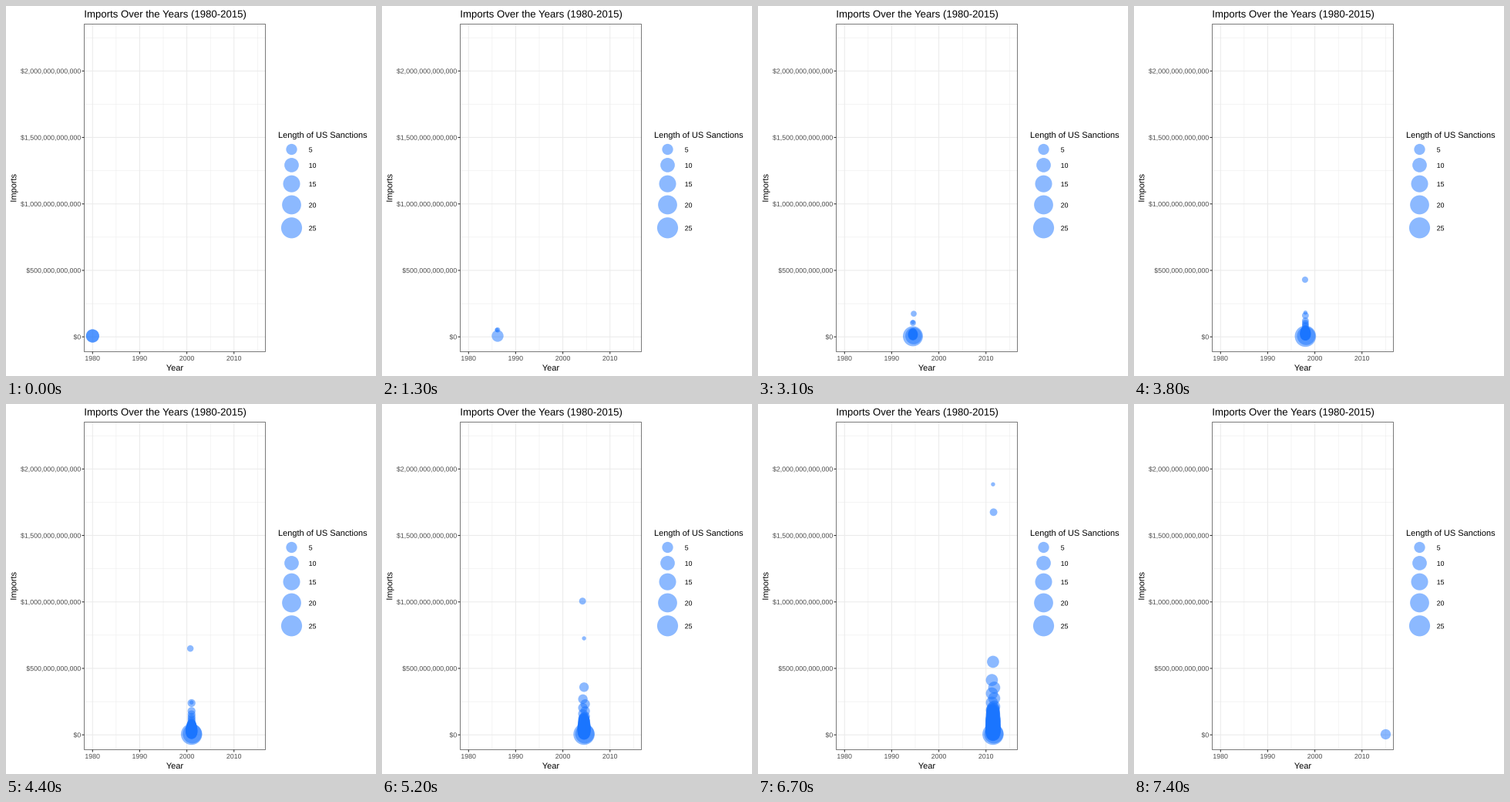
These frames come from a looping animation (480 px wide and 480 px high, 7.5 s). A matplotlib script:

```python
import numpy as np
import matplotlib.pyplot as plt
from matplotlib.animation import FuncAnimation
from matplotlib.patches import PathPatch, Rectangle
from matplotlib.textpath import TextPath
from matplotlib.transforms import Affine2D

plt.rcParams["font.family"] = "Liberation Sans"

SIZE, FRAMES = 480, 75
BLUE, GRID, DARK, GREY = "#1A75FF", "#EBEBEB", "#333333", "#4D4D4D"
LEFT, RIGHT, TOP, BOTTOM = 101.5, 336.5, 23.5, 448.5
BASE = 429.2

fig = plt.figure(figsize=(SIZE / 72, SIZE / 72), dpi=72, facecolor="white")
ax = fig.add_axes([0, 0, 1, 1])
ax.set(xlim=(0, SIZE), ylim=(SIZE, 0))
ax.axis("off")


def year_x(year):
    return 112.3 + year * 6.115


def line(xs, ys, color=DARK, width=1.07, z=2):
    ax.plot(xs, ys, color=color, lw=width, zorder=z, solid_capstyle="butt", snap=False)


def label(x, y, text, size=8.8, color="black", align=0.0, angle=0):
    """Text outline on baseline y; align 0 is left, 0.5 centre, 1 right."""
    path = TextPath((0, 0), text, size=size)
    box = path.get_extents()
    start = -align * (box.x0 + box.x1)
    place = Affine2D().translate(start, 0).scale(1, -1).rotate_deg(-angle).translate(x, y)
    ax.add_patch(PathPatch(place.transform_path(path), fc=color, lw=0, zorder=4))


def bubble_layer(**kw):
    return ax.scatter([], [], c=BLUE, alpha=0.5, linewidths=0, snap=False, **kw)


def set_bubbles(layer, x, y, r):
    layer.set_offsets(np.column_stack([x, y]))
    layer.set_sizes((2 * np.asarray(r)) ** 2)


def radius(length):
    return 2.7 + 2.22 * np.sqrt(np.maximum(length - 1, 0))


def draw_chart():
    for year in range(0, 36, 5):
        x, major = year_x(year), year % 10 == 0
        line([x, x], [TOP, BOTTOM], GRID, 1.07 if major else 0.53, 1 + major)
        if major:
            line([x, x], [BOTTOM, BOTTOM + 3])
            label(x, 460, str(1980 + year), color=GREY, align=0.5)
    for value in range(0, 2251, 250):
        y, major = BASE - value * 0.17245, value % 500 == 0
        line([LEFT, RIGHT], [y, y], GRID, 1.07 if major else 0.53, 1 + major)
        if major:
            line([LEFT - 3, LEFT], [y, y])
            label(97, y + 3.2, f"${value * 10**9:,}", color=GREY, align=1)
    ax.add_patch(Rectangle((LEFT, TOP), RIGHT - LEFT, BOTTOM - TOP, fill=False,
                           ec=DARK, lw=0.65, zorder=5, snap=False))
    label(101.3, 14.8, "Imports Over the Years (1980-2015)", 13.2)
    label(219, 473, "Year", 11, align=0.5)
    label(13.3, 236, "Imports", 11, align=0.5, angle=90)


def draw_legend():
    label(353, 171, "Length of US Sanctions", 11)
    lengths = np.arange(5, 26, 5)
    r = radius(lengths)
    # Keys are stacked edge to edge with a small gap
    y = 186 + np.concatenate([[0], np.cumsum(r[1:] + r[:-1] + 3.9)])
    set_bubbles(bubble_layer(), np.full(5, 370.5), y, r)
    for n, mid in zip(lengths, y):
        label(392.7, mid + 3.5, str(n))


def year_at(f):
    """Each year snaps to its nearest frame; between those, time is linear."""
    years = np.arange(36)
    return np.interp(f, np.round(years * (FRAMES - 1) / 35), years)


def growth(year):
    return 0.1 + 1 / (1 + np.exp((24 - year) / 4))


def crowd(year):
    """Many small importers near zero, joining one by one from 1987."""
    grow, big = growth(year), radius(min(8 + year, 26))
    small = 3 + 5.5 * grow
    for i in range(30):
        if year >= 7 + 0.7 * i:
            rank, spread = (i * 0.618) % 1, 1 - (i * 0.377) % 1
            r = small + (1 - rank) * spread * (big - small)
            yield 0, 0.8 + 36 * grow * rank ** 1.6, r


def middle(year):
    """Mid-sized importers, swaying apart between whole years."""
    grow, apart = growth(year), 3 * abs(year - round(year))
    for j in range(8):
        if year >= 14 + j:
            yield apart * (-1) ** j * (j > 0), grow * (98 - 24.5 * np.sqrt(j)), 3 + 5 * grow


def leaders(f):
    """The two largest importers, rising from the crowd."""
    if f >= 13:
        sway = 2 * np.sin(2 * np.pi * (f - 8) / 56)
        yield sway, np.interp(f, (13, 31, 44, 73), (9, 30, 112, 335)), 3.3 + 0.03 * (f - 13)
        yield 0, np.interp(f, (13, 31, 44, 59, 67, 73), (9, 19, 42, 198, 325, 389)), 2.7


def bubbles(f):
    """Rows of x shift, height above zero and radius."""
    year = year_at(f)
    if year >= 35:
        return [(0, 1.7, radius(4.2))]
    if f < 12:
        return [(0, 1.2, radius(8 + year))] * 2
    newcomer = (1, 1.2, radius(min(year, 20)))
    return [newcomer, *crowd(year), *middle(year), *leaders(f)]


draw_chart()
draw_legend()
dots = bubble_layer(zorder=3)
dots.set_clip_path(Rectangle((LEFT, TOP), RIGHT - LEFT, BOTTOM - TOP,
                             transform=ax.transData))


def update(f):
    shift, height, r = np.array(bubbles(f)).T
    set_bubbles(dots, year_x(year_at(f)) + shift, BASE - height, r)
    return dots,


anim = FuncAnimation(fig, update, frames=FRAMES, interval=100,
                     repeat=True, repeat_delay=0)
plt.show()
```
